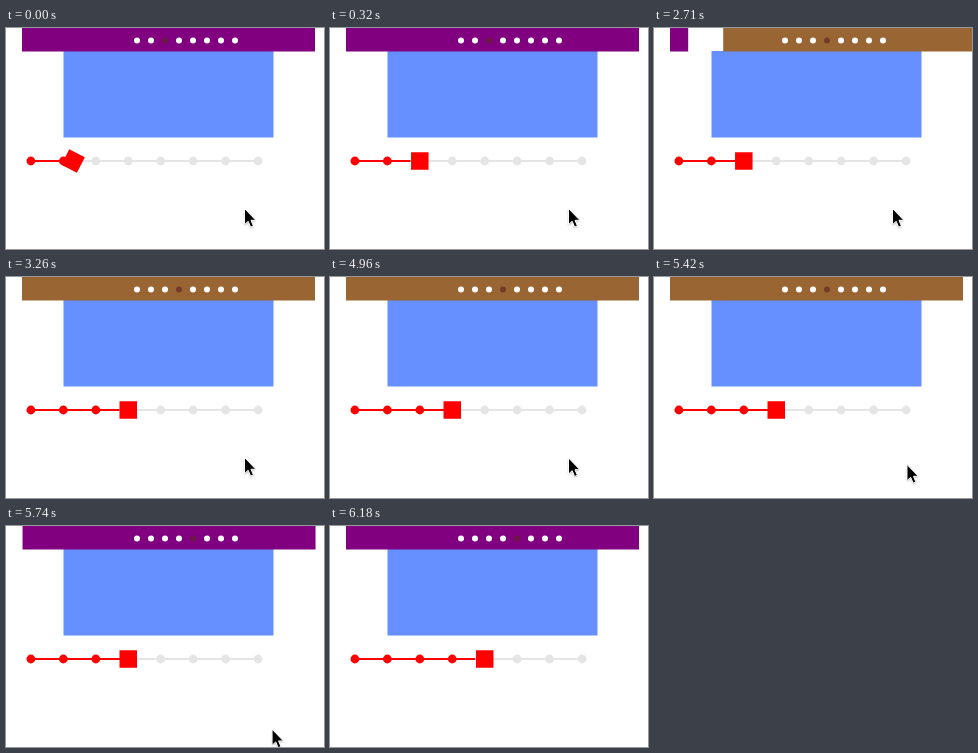
Recreate the animation shown at these times as an HTML page with a canvas. Size 318 by 221 pixels, loop 6.3 s.

```html
<!DOCTYPE html>
<html lang="en">
<head>
<meta charset="utf-8">
<title>Slider with step track</title>
<style>
  html, body { margin: 0; width: 100%; height: 100%; overflow: hidden; background: #fff; }
  canvas { display: block; }
</style>
</head>
<body>
<canvas width="318" height="221"></canvas>
<script>
const LOOP = 6300;
const STARTS = [-416, 2516, 5448];   // slide changes, ms
const SLIDE_MS = 317, MOVE_MS = 333, LINE_MS = 590;
const LEFT = 16, SLIDE_W = 293, PITCH = 328;
const PURPLE = '#800080', BROWN = '#996633', RED = '#ff0000', GREY = '#e5e5e5';
const TRACK_Y = 133;

// pointer path: time, x, y
const PATH = [[0, 238.5, 180.5], [4959, 238.5, 180.5], [4960, 238.5, 180.9], [5090, 238.5, 180.9],
  [5570, 259.5, 190.5], [5740, 266, 203], [5900, 274, 224]];
const arrow = new Path2D('M0 0V16.2L3.7 12.8L6.1 18.6L8.9 17.4L6.5 11.8H11.4Z');

const ctx = document.querySelector('canvas').getContext('2d');
const clamp = v => Math.max(0, Math.min(1, v));
const ease = p => 1 - (1 - p) ** 3 * (1 + 3 * p);
const stepX = i => 24.9 + 32.45 * i;

function rect(x, y, w, h, color) {
  ctx.fillStyle = color;
  ctx.fillRect(x, y, w, h);
}

function dot(x, y, r, color) {
  ctx.fillStyle = color;
  ctx.beginPath();
  ctx.arc(x, y, r, 0, 2 * Math.PI);
  ctx.fill();
}

function drawSlides(k, age) {
  const shown = age >= 24;
  const offset = shown ? PITCH * ease(clamp(age / SLIDE_MS)) : 0;
  const colors = k % 2 ? [PURPLE, BROWN] : [BROWN, PURPLE];
  ctx.save();
  ctx.beginPath();
  ctx.rect(LEFT, 0, 318 - LEFT, 24);
  ctx.clip();
  colors.forEach((c, i) => rect(LEFT + i * PITCH - offset, 0, SLIDE_W, 23.5, c));
  ctx.restore();
  const active = k + (shown ? 2 : 1);
  for (let i = 0; i < 8; i++)
    dot(131 + 14 * i, 12.4, 3, i === active ? 'rgba(100,35,35,.65)' : '#fff');
}

function drawTrack(k, age) {
  const from = k + 1, move = clamp(age / MOVE_MS);
  const filled = from + clamp(age / LINE_MS);
  rect(stepX(0), TRACK_Y - 1, stepX(7) - stepX(0), 2, GREY);
  rect(stepX(0), TRACK_Y - 1, stepX(filled) - stepX(0), 2, RED);
  for (let i = 0; i < 8; i++) dot(stepX(i), TRACK_Y, 4.4, i <= from ? RED : GREY);
  ctx.save();
  ctx.translate(stepX(from + move), TRACK_Y);
  ctx.rotate(move * Math.PI / 2);
  rect(-8.75, -8.75, 17.5, 17.5, RED);
  ctx.restore();
}

function drawPointer(t) {
  const n = PATH.findIndex(p => p[0] > t);
  if (n < 0) return;
  const [t0, x0, y0] = PATH[n - 1], [t1, x1, y1] = PATH[n];
  const p = (t - t0) / (t1 - t0);
  ctx.save();
  ctx.translate(x0 + (x1 - x0) * p, y0 + (y1 - y0) * p);
  ctx.shadowColor = 'rgba(0,0,0,.35)';
  ctx.shadowBlur = 2;
  ctx.shadowOffsetY = 1;
  ctx.fillStyle = '#000';
  ctx.fill(arrow);
  ctx.shadowColor = 'transparent';
  ctx.strokeStyle = '#fff';
  ctx.stroke(arrow);
  ctx.restore();
}

function draw(now) {
  const t = now % LOOP;
  const k = STARTS.filter(s => s <= t).length - 1;
  const age = t - STARTS[k];
  rect(0, 0, 318, 221, '#fff');
  rect(57.5, 23, 210, 86.5, '#6690ff');
  drawSlides(k, age);
  drawTrack(k, age - SLIDE_MS);
  drawPointer(t);
}

const begin = performance.now();
function tick() {
  draw(performance.now() - begin);
  requestAnimationFrame(tick);
}
tick();
</script>
</body>
</html>
```
